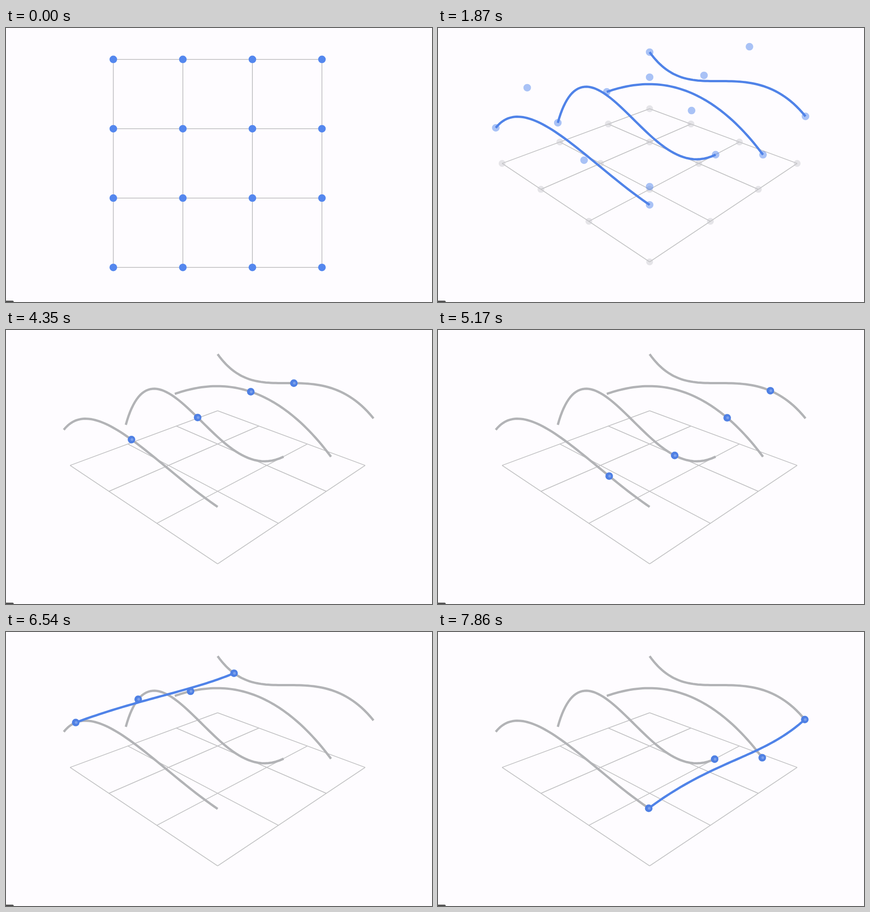
Write an HTML page with a canvas that moves like this. It is 932 by 601 pixels and loops after 8 s.

```html
<!DOCTYPE html>
<html lang="en">
<head>
<meta charset="utf-8">
<title>Bezier surface</title>
<style>
  html, body { margin: 0; width: 100%; height: 100%; overflow: hidden; background: #fefcff; }
  canvas { display: block; }
</style>
</head>
<body>
<canvas id="stage" width="932" height="601"></canvas>
<script>
const ctx = document.getElementById('stage').getContext('2d');
const LOOP = 8000;
const CENTER = [463, 297], DIST = 6.52, FOCAL = 992;
const BLUE = [80, 131, 232], GREY = [178, 179, 182];

// Heights of the control points, back row first
const HEIGHTS = [
  [1.053, 0.248, 1.502, 0.73],
  [0.579, 1.055, 1.306, 0.508],
  [0.329, 2.21, 0.041, 0.876],
  [0.56, 1.383, 0.809, 0.703]
];
const STEPS = [0, 1, 2, 3];

const mix = (a, b, k) => a + (b - a) * k;
const ramp = (t, from, to) => Math.min(1, Math.max(0, (t - from) / (to - from)));
const easeCubic = x => x < 0.5 ? 4 * x ** 3 : 1 - 4 * (1 - x) ** 3;
const rgb = c => `rgb(${c.map(Math.round)})`;

// Camera turns from straight above to a corner view
function camera(k) {
  const turn = k * Math.PI / 4, tilt = mix(90, 28.55, k) * Math.PI / 180;
  const ct = Math.cos(turn), st = Math.sin(turn);
  const cp = Math.cos(tilt), sp = Math.sin(tilt);
  return ([x, h, z]) => {
    const u = x * ct - z * st, v = x * st + z * ct;
    const scale = FOCAL / (DIST - v * cp - h * sp);
    return [CENTER[0] + u * scale, CENTER[1] + (v * sp - h * cp) * scale];
  };
}

function bezier(p, t) {
  const s = 1 - t, w = [s * s * s, 3 * s * s * t, 3 * s * t * t, t * t * t];
  return STEPS.map(a => a < 3 ? w.reduce((sum, k, i) => sum + k * p[i][a], 0) : 0).slice(0, 3);
}

const sample = p => Array.from({ length: 61 }, (_, i) => bezier(p, i / 60));

function stroke(points, color, width, alpha = 1) {
  ctx.globalAlpha = alpha;
  ctx.strokeStyle = color;
  ctx.lineWidth = width;
  ctx.beginPath();
  points.forEach(p => ctx.lineTo(...p));
  ctx.stroke();
}

function dot([x, y], r, color, alpha = 1) {
  ctx.globalAlpha = alpha;
  ctx.fillStyle = color;
  ctx.beginPath();
  ctx.arc(x, y, r, 0, 7);
  ctx.fill();
}

// Position along the curves: swings back and forth, a little slower once the cross curve shows
function swing(t) {
  const deg = t < 5920 ? 0.4 * Math.max(0, t - 3690) : 892 + 0.3713 * (t - 5920);
  return (1 - Math.cos(deg * Math.PI / 180)) / 2;
}

function draw(t) {
  const k = easeCubic(ramp(t, 1059, 1699));
  const project = camera(k);
  const node = (i, row, h) => [i - 1.5, h, row - 1.5];
  const rows = HEIGHTS.map((hs, row) => hs.map((h, i) => node(i, row, h * k)));

  ctx.globalAlpha = 1;
  ctx.fillStyle = '#fefcff';
  ctx.fillRect(0, 0, 932, 601);
  ctx.fillStyle = '#555';
  ctx.beginPath();
  ctx.roundRect(-4, 598, 21, 8, 3);
  ctx.fill();

  const leave = ramp(t, 2800, 3300);
  const intro = ramp(t, 380, 780);

  // Flat grid
  for (const i of STEPS) {
    stroke([node(i, 0, 0), node(i, 3, 0)].map(project), '#c3c3c5', 1.8);
    stroke([node(0, i, 0), node(3, i, 0)].map(project), '#c3c3c5', 1.8);
  }
  if (leave < 1) {
    for (const row of STEPS) for (const i of STEPS)
      dot(project(node(i, row, 0)), 7.5, '#c8c8cb', 0.45 * (1 - leave));
    for (const p of rows.flat())
      dot(project(p), 8.3, '#5487ee', mix(1, 0.5, intro) * (1 - leave));
  }

  // Row curves
  const tone = rgb(BLUE.map((c, i) => mix(c, GREY[i], leave)));
  if (intro > 0)
    for (const p of rows) stroke(sample(p).map(project), tone, 5, intro);

  // Travelling points and the curve they control
  const show = ramp(t, 3300, 3650);
  if (show > 0) {
    const s = swing(t);
    const movers = rows.map(p => bezier(p, s));
    const cross = ramp(t, 5910, 6250);
    if (cross > 0) stroke(sample(movers).map(project), rgb(BLUE), 5, cross);
    for (const p of movers) {
      const [x, y] = project(p);
      dot([x, y], 8.3, '#4f80e4', show);
      dot([x + 1, y], 3, '#fff', 0.25 * show);
    }
  }
}

function frame() {
  draw(performance.now() % LOOP);
  requestAnimationFrame(frame);
}
frame();
</script>
</body>
</html>
```
